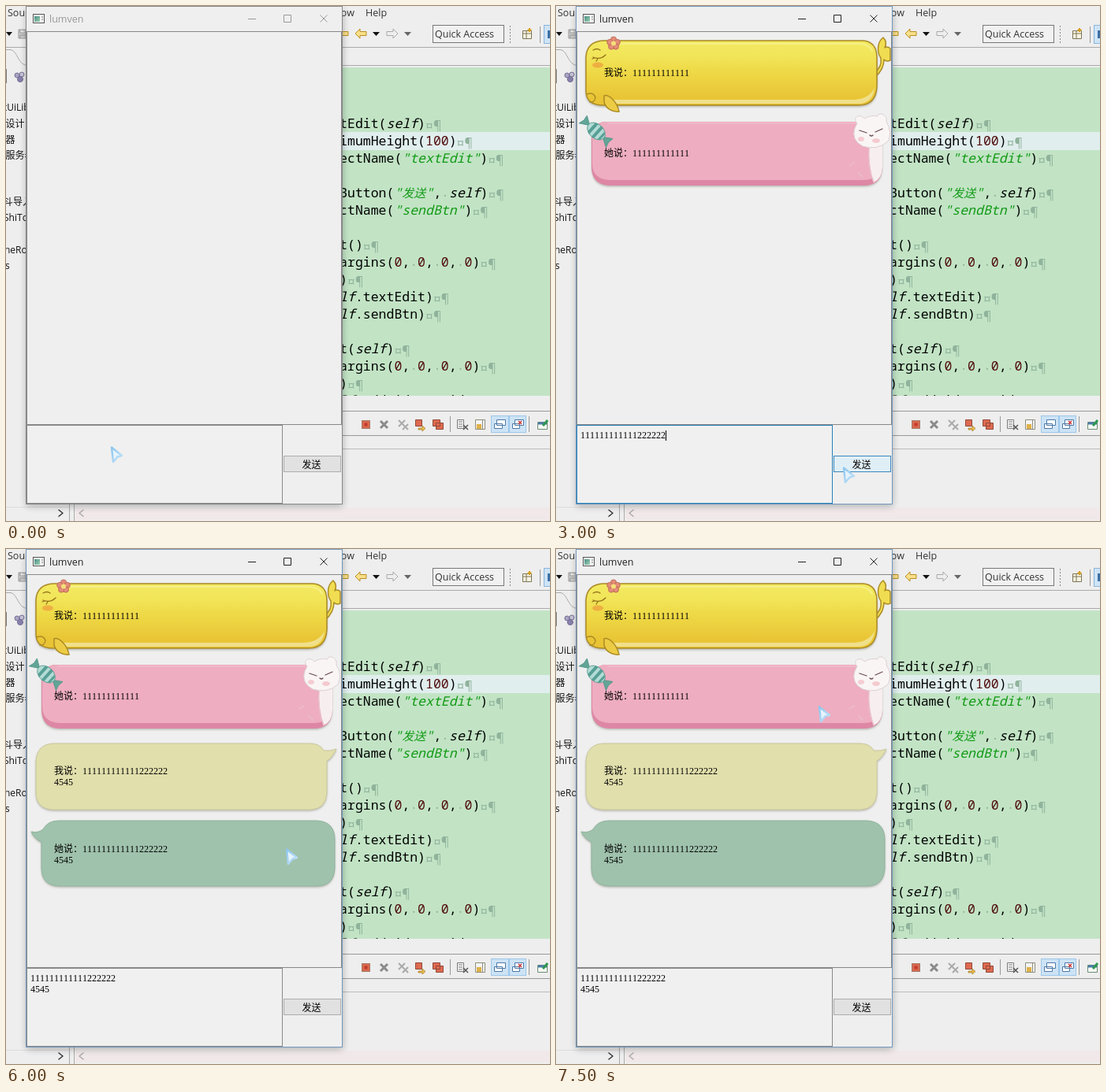
An HTML page for the animation above (8000 ms loop, 690 px wide and 654 px high).

```html
<!DOCTYPE html>
<html lang="zh">
<head>
<meta charset="utf-8">
<title>Chat bubbles</title>
<style>
html, body { margin: 0; width: 100%; height: 100%; overflow: hidden; background: #eee; }
svg { display: block; width: 690px; height: 654px; }
text { white-space: pre; font-kerning: none; }
.ui { font: 12.5px "Open Sans", "Noto Sans", "Noto Sans CJK SC", "Noto Sans CJK", sans-serif; fill: #333; }
.tree { font-size: 12px; fill: #111; }
.song { font: 12px "Liberation Serif", "Noto Sans CJK SC", "Noto Sans CJK", serif; fill: #000; }
.code { font: 16.5px "Noto Sans Mono", "Noto Sans CJK SC", "Noto Sans CJK", monospace; fill: #000; }
.self { font-style: italic; }
.str { font-style: italic; fill: #129a16; }
.num { fill: #4f0c0c; }
.mark { fill: #8fb39b; }
.line { fill: none; stroke-linecap: round; stroke-linejoin: round; }
</style>
</head>
<body>
<svg viewBox="0 0 690 654">
<defs>
  <linearGradient id="gold" x2="0" y2="1">
    <stop offset="0" stop-color="#f3ea62"/><stop offset=".25" stop-color="#f1e458"/>
    <stop offset=".5" stop-color="#eed845"/><stop offset=".85" stop-color="#e9c636"/><stop offset="1" stop-color="#e9c233"/>
  </linearGradient>
  <linearGradient id="tip" x1="0" y1="0" x2="1" y2="1">
    <stop offset="0" stop-color="#8ec6ee"/><stop offset="1" stop-color="#c4e3f8"/>
  </linearGradient>
  <linearGradient id="app" x2="1" y2="1"><stop offset="0" stop-color="#4c8f86"/><stop offset="1" stop-color="#9fd0b4"/></linearGradient>
  <filter id="blur" x="-10%" y="-10%" width="120%" height="120%"><feGaussianBlur stdDeviation="5"/></filter>
  <filter id="soft" x="-5%" y="-15%" width="110%" height="135%"><feDropShadow dx="0" dy="1.500" stdDeviation="1" flood-color="#665" flood-opacity=".4"/></filter>
  <clipPath id="editor"><rect x="424" y="78" width="266" height="417"/></clipPath>
</defs>

<rect width="690" height="654" fill="#eee"/>

<!-- menu and toolbar -->
<g class="ui">
  <text x="2" y="13">Sou</text><text x="442" y="13" text-anchor="end">Window</text><text x="456" y="13">Help</text>
</g>
<path d="M0 33h8l-4 5zM465 33h9l-4.500 5z" fill="#111"/>
<path d="M505 33h9l-4.500 5z" fill="#666"/>
<path d="M16 30h9v11h-9zM18 30v4h7M18 41v-4h7" fill="#ccc" stroke="#999"/>
<path id="back" d="M443 35l6-6v3.500h8v5h-8v3.500z" fill="#f8e08a" stroke="#b98d23"/>
<use href="#back" x="-23"/>
<path d="M497 35l-6-6v3.500h-8v5h8v3.500z" fill="#eee" stroke="#aaa"/>
<rect x="541.500" y="24.500" width="90" height="22" fill="#f1f1f1" stroke="#777"/>
<text class="ui" x="544" y="40">Quick Access</text>
<path d="M639.500 25v23" stroke="#888" stroke-dasharray="2 2"/>
<path d="M655.500 31.500h11v10h-11zM655 35h12M660 31v11" fill="#f7f4e4" stroke="#7c7454"/>
<path d="M664 33v-5M661.500 30.500h5" stroke="#d6a021" stroke-width="2"/>
<path d="M677.500 26v21" stroke="#999"/>
<rect x="682.500" y="24.500" width="12" height="23" fill="#cfe4f6" stroke="#8ab6dc"/>
<rect x="687" y="31" width="3" height="10" fill="#3c6fa5"/>

<!-- left panel -->
<path d="M0 55.500h6C15 57 15 75.500 27 75.500M0 52.500H26" class="line" stroke="#aaa"/>
<path d="M.500 80v18" stroke="#777"/>
<g stroke="#766f96"><circle cx="14" cy="88" r="3" fill="#aaa4c4"/><circle cx="20" cy="87" r="3" fill="#c9c6d8"/><circle cx="18" cy="93" r="3.500" fill="#8981ad"/></g>
<g class="ui tree">
  <text x="-3" y="133">tUiLib</text><text x="-.500" y="154">设计</text><text x="-.500" y="174">器</text><text x="-.500" y="194">服务器</text>
  <text x="-3" y="253">斗导入</text><text x="-3" y="273">ShiTool</text><text x="-2" y="314">neRoom</text><text x="-1" y="334">s</text>
</g>
<path d="M0 636.500H80" stroke="#ddd"/>
<path d="M67 640l5 4-5 4" class="line" stroke="#333" stroke-width="1.500"/>
<path d="M80.500 545V654M86.500 545V654" stroke="#aaa"/>
<rect x="88" y="637" width="602" height="15" fill="#f1e8ea"/>
<path d="M98 640l-5 4 5 4" class="line" stroke="#aaa" stroke-width="1.500"/>

<!-- editor -->
<path d="M420 52.500H690M420 75.500H690" stroke="#aaa"/>
<g clip-path="url(#editor)">
  <rect x="424" y="78" width="266" height="417" fill="#c2e4c5"/>
  <rect x="424" y="160" width="266" height="23" fill="#e1eeee"/>
  <g id="code" class="code"></g>
</g>

<!-- console bar -->
<path d="M420 514.500H690M420 545.500H690" stroke="#999"/>
<path d="M420 562.500H690" stroke="#bbb"/>
<rect x="615.500" y="520.500" width="22" height="21" fill="#cde3f5" stroke="#9cc7ea"/>
<rect x="638.500" y="520.500" width="21" height="21" fill="#cde3f5" stroke="#9cc7ea"/>
<rect x="451.500" y="526.500" width="10" height="10" fill="#d9694f" stroke="#a67a68"/>
<rect x="454.500" y="529.500" width="4" height="4" fill="#c43a2c"/>
<path d="M475 527l9 9m0-9l-9 9" stroke="#8a8a8a" stroke-width="3"/>
<path d="M498 526l8 8m0-8l-8 8M503 531l7 7m0-7l-7 7" stroke="#aaa" stroke-width="2"/>
<g fill="#df6a50" stroke="#8e4b3b">
  <path d="M519.500 525.500h8v8h-8zM541.500 525.500h9v8h-9zM545.500 529.500h9v8h-9z"/>
</g>
<path d="M523 536h5v-3l4 3.500-4 3.500v-2h-5z" fill="#e9bd46" stroke="#a3772d" stroke-width=".7"/>
<path d="M563.500 521v20M663.500 521v20" stroke="#999"/>
<path d="M572.500 525.500h8v11h-8zM574 528h5M574 531h5M574 534h5" fill="#f6f6f6" stroke="#7a7a7a"/>
<path d="M580 532l6 6m0-6l-6 6" stroke="#555" stroke-width="1.500"/>
<path d="M595.500 525.500h12v12h-12zM604.500 526v11" fill="#f4f4f4" stroke="#8c8c7c"/>
<rect x="597" y="531" width="6" height="6" fill="#dfb149"/>
<g fill="#fff" stroke="#4d79a8">
  <path d="M622.500 525.500h11v7h-11zM619.500 530.500h10v6h-10zM645.500 525.500h11v7h-11zM642.500 530.500h9v6h-9z"/>
</g>
<path d="M650 527l4 4m0-4l-4 4" stroke="#c33" stroke-width="1.500"/>
<path d="M674.500 528.500h12v9h-12z" fill="#f6f9f5" stroke="#6d8d72"/>
<path d="M675 530h11" stroke="#4a7cab" stroke-width="3"/><path d="M681 533l6-7" stroke="#2d9950" stroke-width="3"/>

<!-- chat window -->
<rect x="26" y="4" width="401" height="631" fill="#000" opacity=".28" filter="url(#blur)"/>
<rect id="frame" x="25.500" y=".500" width="401" height="632" fill="#efefef"/>
<rect x="34.500" y="10.500" width="14" height="11" fill="#f6f6f6" stroke="#555"/>
<rect x="36" y="13" width="7" height="7" fill="url(#app)"/><path d="M45 14h2M45 17h2" stroke="#777"/>
<g id="caption">
  <text class="ui" x="55" y="21" style="fill: inherit">lumven</text>
  <path id="buttons" d="M307 16.500h10M352.500 11.500h9v9h-9zM398.500 11.500l9 9m0-9l-9 9" fill="none"/>
</g>
<rect x="26.500" y="32.500" width="399" height="499" fill="#efefef" stroke="#888"/>
<rect id="edit" x="26.500" y="532.500" width="324" height="99" fill="#f0f0f0"/>
<rect id="send" x="352.500" y="571.500" width="72" height="20"/>
<text class="song" x="375.500" y="586.500">发送</text>
<g class="song"><text id="row0" x="31" y="549"></text><text id="row1" x="31" y="563"></text></g>
<path id="caret" d="M.500 0v13" stroke="#000"/>

<!-- first pair of bubbles -->
<g id="pair0">
  <g stroke="#ab8b25" stroke-width="1.500" stroke-linejoin="round">
    <path d="M404 84C411 80 413 74 412 66C407 59 407 46 415 40C419 44 419 49 417 53C420 51 422 52 424 54V69C420 71 418 70 416 68C416 78 412 84 405 90z" fill="#f0dd51"/>
    <path d="M60 44H389Q407 45 407 66V102Q406 126 384 126H60Q38 126 38 108V65Q39 45 60 44z" fill="url(#gold)" filter="url(#soft)"/>
  </g>
  <path d="M66 119H378Q397 118 404 104Q402 124 383 124H66z" fill="#f0e08a"/>
  <path d="M70 48H386Q397 49 401 57" class="line" stroke="#f8f29a" stroke-width="2" opacity=".7"/>
  <path d="M61 114C66 112 77 120 80 134C71 135 63 130 61 122z" fill="#edcc45" stroke="#ab8b25" stroke-width="1.500"/>
  <path d="M39 112Q47 109 50 116Q49 123 43 122" class="line" stroke="#ab8b25" stroke-width="1.500"/>
  <path d="M47 65Q56 69 63 62M49 66l-3 1M53 67l-2 3M47 56q5-3 9 0" class="line" stroke="#94721d" stroke-width="1.300"/>
  <ellipse cx="53" cy="75" rx="7" ry="3.500" fill="#efa33e" opacity=".8"/>
  <g id="flower" fill="#e38d78" stroke="#b86350" stroke-width=".8"></g>
  <circle cx="73" cy="47.500" r="3" fill="#f5df78"/>

  <path d="M64 147H394Q414 147 414 170V205Q413 228 390 228H68Q45 227 45 204V168Q46 147 64 147z" fill="#dd87a5" filter="url(#soft)"/>
  <path d="M64 147H394Q414 147 414 168V199Q412 221 390 221H68Q46 220 46 200V168Q46 147 64 147z" fill="#eeadc0"/>
  <path d="M66 149H384" class="line" stroke="#f2b9c9" stroke-width="2"/>
  <path d="M397 176L414 171V205Q413 220 403 224Q396 202 397 176z" fill="#f7eef0"/>
  <path d="M397 180Q395 205 403 224M372 203l6-4M384 212l5 5" class="line" stroke="#e9bfcb" stroke-width="1.500"/>
  <path d="M382 149C375 141 386 136 391 143Q399 138 408 140C408 134 421 137 419 147Q427 160 421 172Q407 184 389 178Q374 170 379 155z" fill="#faf5f5" stroke="#dcd1d3"/>
  <path d="M385 158l9 3M405 160l9-4M398 164q2 2 4 0" class="line" stroke="#6a4c51" stroke-width="1.300"/>
  <ellipse cx="387" cy="169" rx="4" ry="3" fill="#f5cdd3"/><ellipse cx="406" cy="171" rx="5" ry="3" fill="#f4cbd0"/>
  <g transform="rotate(42 51 159)" stroke="#4d9487" stroke-width=".8">
    <path d="M40 159L29 152L30 159L28 166zM62 159L73 152L72 159L74 166z" fill="#62a597"/>
    <ellipse cx="51" cy="159" rx="13" ry="9" fill="#b4dcd6"/>
    <path d="M43 152l4-2v18l-4-2zM51 150h4v18h-4zM59 152l3 3v9l-3 2z" fill="#579f95" stroke="none"/>
  </g>
  <g class="song"><text x="61" y="89">我说：111111111111</text><text x="61" y="191">她说：111111111111</text></g>
</g>

<!-- second pair of bubbles -->
<g id="pair1">
  <path d="M60 247H386Q398 247 403 256Q412 257 419 254Q414 265 407 269V310Q406 330 386 331H60Q38 330 38 309V270Q39 248 60 247z" fill="#e1dfac" stroke="#c9c69b" filter="url(#soft)"/>
  <path d="M67 345H394Q417 346 417 369V405Q416 428 394 428H67Q45 427 45 405V372Q36 368 32 359Q41 361 47 356Q53 345 67 345z" fill="#9fc2ac" stroke="#8fb39d" filter="url(#soft)"/>
  <g class="song">
    <text x="61" y="286">我说：111111111111222222</text><text x="61" y="300">4545</text>
    <text x="61" y="385">她说：111111111111222222</text><text x="61" y="399">4545</text>
  </g>
</g>

<path id="cursor" d="M2 1.500L15 12L9.500 13.500L4 20z" fill="#e6f3fc" stroke="url(#tip)" stroke-width="2.400" stroke-linejoin="round"/>
</svg>

<script>
const $ = id => document.getElementById(id);
const CHAR = 9.9, LEFT = 423.1;

// row number, text
const code = [
  [0, 'tEdit(self)'], [1, 'imumHeight(100)'], [2, 'ectName("textEdit")'],
  [4, 'Button("发送",·self)'], [5, 'ctName("sendBtn")'],
  [7, 't()'], [8, 'argins(0,·0,·0,·0)'], [9, ')'], [10, 'lf.textEdit)'], [11, 'lf.sendBtn)'],
  [13, 't(self)'], [14, 'argins(0,·0,·0,·0)'], [15, ')'], [16, 'lf.addWidget(widget)']
];
const kind = s => s[0] === '"' ? 'str' : /^(self|lf)$/.test(s) ? 'self'
  : /^\d/.test(s) ? 'num' : /^[·¤]/.test(s) ? 'mark' : '';
const widthOf = s => [...s].reduce((w, c) => w + (c > '\u2fff' ? 15 : CHAR), 0);

$('code').innerHTML = code.map(([row, line]) => {
  let x = LEFT;
  return (line + '¤¶').split(/(".*?"|self|^lf|\d+|·|¤¶)/).filter(Boolean).map(s => {
    const at = x, type = kind(s);
    x += widthOf(s);
    // wide characters are set smaller inside a string
    const body = s.replace(/[\u3000-\u9fff]+/, w => `<tspan font-size="15">${w}</tspan>`);
    // whitespace marks hang below the text
    const y = 155 + row * 22 + (type === 'mark' ? 3 : 0);
    return `<text class="${type}" x="${at.toFixed(1)}" y="${y}">${body}</text>`;
  }).join('');
}).join('');

$('flower').innerHTML = [0, 1, 2, 3, 4].map(i => {
  const a = (i * 72 - 90) * Math.PI / 180;
  return `<circle cx="${73 + 5 * Math.cos(a)}" cy="${47.5 + 5 * Math.sin(a)}" r="3.6"/>`;
}).join('');

const STEP = 500;
const ones = '1'.repeat(12), full = ones + '222222';
const plain = '#e1e1e1', lit = '#e0eff6';
// pointer x, y, typed rows, caret row (-1 for none), focus, button fill, bubble pairs
const steps = [
  [132, 559, [''], -1, '', plain, 0],
  [132, 559, [''], 0, 'edit', plain, 0],
  [362, 590, [ones], 0, 'edit', lit, 0],
  [336, 581, [ones], -1, 'send', '#dbe8f2', 1],
  [100, 548, [ones], -1, 'edit', plain, 1],
  [336, 581, [ones], 0, 'edit', plain, 1],
  [363, 585, [full], 0, 'edit', lit, 1],
  [363, 585, [full, ''], 1, 'edit', lit, 1],
  [363, 585, [full, '45'], 1, 'edit', lit, 1],
  [363, 585, [full, '4545'], -1, 'send', '#d7ecf0', 1],
  [428, 495, [full, '4545'], -1, 'send', '#dce6ee', 2],
  [396, 442, [full, '4545'], -1, '', plain, 2],
  [354, 380, [full, '4545'], -1, '', plain, 2],
  [321, 326, [full, '4545'], -1, '', plain, 2],
  [328, 258, [full, '4545'], -1, '', plain, 2],
  [332, 199, [full, '4545'], -1, '', plain, 2]
];

const set = (id, attrs) => {
  for (const k in attrs) $(id).setAttribute(k, attrs[k]);
};
const show = (id, on) => set(id, { visibility: on ? 'visible' : 'hidden' });

function draw(i) {
  const [x, y, rows, caret, focus, fill, pairs] = steps[i];
  const active = i > 0, ink = active ? '#222' : '#999';
  set('frame', { stroke: active ? '#7298bd' : '#888' });
  set('caption', { fill: ink });
  set('buttons', { stroke: ink });
  set('edit', { stroke: focus === 'edit' ? '#2580b8' : '#888' });
  set('send', { fill, stroke: fill === plain ? '#adadad' : '#3b87bd' });
  $('row0').textContent = rows[0];
  $('row1').textContent = rows[1] || '';
  show('caret', caret >= 0);
  if (caret >= 0) set('caret', { transform: `translate(${31 + 6 * rows[caret].length} ${539 + 14 * caret})` });
  show('pair0', pairs > 0);
  show('pair1', pairs > 1);
  set('cursor', { transform: `translate(${x} ${y})` });
}

const start = performance.now();
let last = -1;
function tick() {
  const t = Math.max(0, performance.now() - start) % (STEP * steps.length);
  const i = Math.floor(t / STEP);
  if (i !== last) draw(last = i);
  requestAnimationFrame(tick);
}
tick();
</script>
</body>
</html>
```
